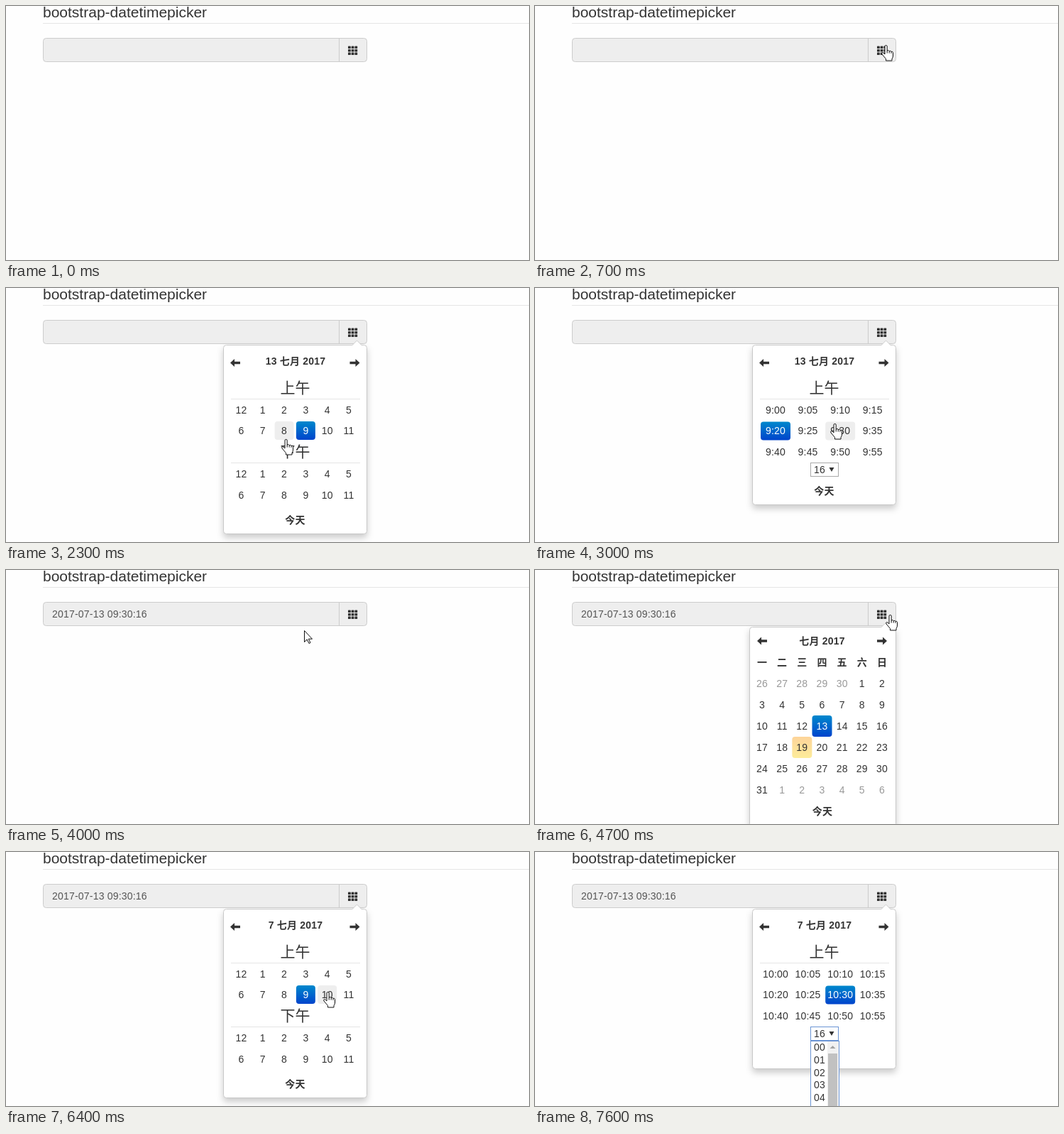
An HTML page for the animation above (8 s loop, 737 by 358 pixels).

```html
<!DOCTYPE html>
<html lang="en">
<head>
<meta charset="utf-8">
<title>Date time picker</title>
<style>
html, body { margin: 0; height: 100%; overflow: hidden; background: #fefefe; }
svg { display: block; }
text { font: 14px "Liberation Sans", Arial, "Noto Sans CJK SC", "Noto Sans CJK", sans-serif; letter-spacing: .2px; fill: #333; text-anchor: middle; white-space: pre; }
.bold { font-weight: bold; }
.big { font-size: 21px; letter-spacing: 0; }
.left { text-anchor: start; }
.old { fill: #999; }
.on { fill: #fff; }
.value { fill: #555; }
.line { stroke: #e5e5e5; }
.field { fill: #eee; stroke: #ccc; }
.popup { fill: #fff; stroke: #c9c9c9; filter: drop-shadow(0 5px 5px rgba(0,0,0,.2)); }
.icon { fill: #333; }
.mouse { fill: #fff; stroke: #111; stroke-linejoin: round; }
</style>
</head>
<body>
<svg width="737" height="358" viewBox="0 0 737 358">
  <defs>
    <linearGradient id="blue" x2="0" y2="1"><stop stop-color="#08c"/><stop offset="1" stop-color="#04c"/></linearGradient>
    <linearGradient id="gold" x2="0" y2="1"><stop stop-color="#fdd49a"/><stop offset="1" stop-color="#fdec9a"/></linearGradient>
  </defs>
  <text class="big left" x="52" y="16">bootstrap-datetimepicker</text>
  <path class="line" d="M52 24.5H737"/>
  <rect class="field" x="52.5" y="45.5" width="456" height="33" rx="4"/>
  <path stroke="#ccc" d="M469.5 46V78"/>
  <g id="scene"></g>
</svg>
<script>
const scene = document.getElementById('scene');
const LOOP = 8000, STEP = 100;

// Pointer hot spot: [step, x, y]
const path = [
  [2, 698, 61], [3, 574, 72], [4, 527, 65], [5, 488, 72], [6, 494, 55], [10, 494, 55],
  [11, 463, 150], [12, 463, 178], [13, 424, 212], [15, 388, 236], [16, 388, 236],
  [19, 391, 220], [21, 391, 220], [24, 395, 209], [26, 419, 199], [27, 419, 199],
  [30, 422, 191], [36, 422, 191], [37, 391, 118], [38, 391, 110], [40, 420, 85],
  [43, 490, 66], [45, 500, 63], [47, 500, 63], [49, 472, 92], [51, 452, 155],
  [53, 436, 203], [59, 436, 203], [64, 453, 197], [66, 453, 197],
  [71, 410, 254], [73, 410, 254], [76, 411, 365], [80, 411, 365]
];

let pointer, hand, menuOpen;

function pointerAt(step) {
  const i = path.findIndex(p => p[0] > step);
  if (i < 1) return null;
  const [t, x, y] = path[i - 1], [t2, x2, y2] = path[i];
  const k = (step - t) / (t2 - t);
  return { x: Math.round(x + (x2 - x) * k), y: Math.round(y + (y2 - y) * k) };
}

const text = (x, y, s, cls = '') => `<text class="${cls}" x="${x}" y="${y}">${s}</text>`;
const rect = (x, y, w, h, fill, r = 0) =>
  `<rect x="${x}" y="${y}" width="${w}" height="${h}" rx="${r}" fill="${fill}"/>`;

const over = (x, y, w, h) => pointer && !menuOpen &&
  pointer.x >= x && pointer.x < x + w && pointer.y >= y && pointer.y < y + h;

// Clickable cell, centred on (cx, cy)
function cell(cx, cy, w, h, label, cls = '', fill = '') {
  const x = cx - w / 2, y = cy - h / 2;
  if (over(x, y, w, h)) { hand = true; fill = fill || '#eee'; }
  return (fill ? rect(x, y, w, h, fill, 4) : '') + text(cx, cy + 5, label, cls);
}

const choice = (cx, cy, w, h, label, active) =>
  cell(cx, cy, w, h, label, active ? 'on' : '', active ? 'url(#blue)' : '');

function frame(left, right, bottom) {
  const tip = right - 13.5;
  return `<rect class="popup" x="${left + .5}" y="80.5" width="${right - left}" height="${bottom - 80}" rx="4"/>
    <path d="M${tip - 7} 81l7-7 7 7" fill="#fff" stroke="#ccc"/>`;
}

function arrows(x1, x2, y) {
  const d = 'M-7 0l6-5.5v3.7h8v3.6h-8v3.7z';
  return `<path class="icon" transform="translate(${x1} ${y})" d="${d}"/>
    <path class="icon" transform="translate(${x2} ${y}) scale(-1 1)" d="${d}"/>`;
}

function calendar(left, active) {
  const col = i => left + 18 + 28.17 * i;
  let s = frame(left, left + 206, 361) + cell(col(3), 100, 141, 30, '七月 2017', 'bold') +
    arrows(col(0), col(6), 100);
  [...'一二三四五六日'].forEach((d, i) => s += text(col(i), 135, d, 'bold'));
  for (let i = 0; i < 42; i++) {
    const d = i - 4, old = d < 1 || d > 31;
    const label = d < 1 ? d + 30 : d > 31 ? d - 31 : d;
    const cls = d === active ? 'on' : old ? 'old' : '';
    const fill = d === active ? 'url(#blue)' : d === 19 ? 'url(#gold)' : '';
    s += cell(col(i % 7), 160 + 30 * Math.floor(i / 7), 28, 30, label, cls, fill);
  }
  return s + text(left + 103, 345, '今天', 'bold');
}

const heading = (label, y) => text(407.5, y, label, 'big') +
  `<path class="line" d="M317 ${y + 8.5}H499"/>`;

const clockFrame = (day, bottom) => frame(306, 508, bottom) +
  text(408, 108, day + ' 七月 2017', 'bold') + arrows(323, 491.5, 105.5);

function hours(day) {
  let s = clockFrame(day, 346) + heading('上午', 148) + heading('下午', 238);
  for (let i = 0; i < 24; i++) {
    const y = [172, 201, 262, 292][Math.floor(i / 6)];
    s += choice(331.5 + 30.3 * (i % 6), y, 27, 26, i % 12 || 12, i === 9);
  }
  return s + text(407.5, 332, '今天', 'bold');
}

function minutes(day, hour, active) {
  let s = clockFrame(day, 305) + heading('上午', 148);
  for (let m = 0; m < 60; m += 5) {
    const i = m / 5, label = hour + ':' + String(m).padStart(2, '0');
    s += choice(339 + 45.6 * (i % 4), 172 + 29.4 * Math.floor(i / 4), 42, 26, label, m === active);
  }
  const edge = menuOpen ? '#6a94d4' : '#a9a9a9';
  s += text(407.5, 291, '今天', 'bold') +
    `<rect x="388.5" y="246.5" width="39" height="19" fill="#fff" stroke="${edge}"/>` +
    text(393, 261, '16', 'left') + '<path class="icon" d="M414.5 253h7l-3.500 6z"/>';
  return s + (menuOpen ? menu() : '');
}

function menu() {
  let s = '<rect x="388.5" y="266.5" width="40" height="100" fill="#fff" stroke="#6a94d4"/>';
  for (let i = 0; i < 6; i++) {
    const y = 267 + 17.8 * i;
    const hot = pointer.y >= y && pointer.y < y + 17.8 && y < 340;
    if (hot) s += rect(389, y, 23, 17.8, '#1e90ff');
    s += text(393, y + 13, '0' + i, hot ? 'left on' : 'left');
  }
  return s + rect(412, 267, 16, 100, '#f1f1f1') + rect(413, 284, 13, 90, '#c1c1c1') +
    '<path d="M415.5 277l4-4 4 4z" fill="#a3a3a3"/>';
}

function grid() {
  let s = '';
  for (let i = 0; i < 9; i++)
    s += rect(482 + 4.7 * (i % 3), 56.5 + 4.5 * Math.floor(i / 3), 3.8, 3.5, '#333', .6);
  return s;
}

function mouse() {
  if (!pointer) return '';
  const { x, y } = pointer;
  return hand
    ? `<path class="mouse" transform="translate(${x - 6} ${y})" d="M5 13V2a1.600 1.600 0 0 1 3.200 0v6q2.300-1.300 3 .6 2.200-1 2.800.7 2.300-.5 2.500 1.200v4.500q0 2.500-1.500 4.500v2.500H6.500v-2.500L1 13q-1-2.200.8-2.400 1.200 0 3.200 2.400z"/>
       <path stroke="#111" fill="none" transform="translate(${x - 6} ${y})" d="M8.200 8v3.500M11.200 8.600v3M14 9.300v2.500"/>`
    : `<path class="mouse" transform="translate(${x} ${y})" d="M.5.5v16l3.700-3.600 2.800 5.600 2-1-2.700-5.300h5.200z"/>`;
}

function popup(step) {
  if (step < 10) return '';
  if (step < 21) return calendar(294, 19);
  if (step < 28) return hours(13);
  if (step < 34) return minutes(13, 9, 20);
  if (step < 47) return '';
  if (step < 57) return calendar(302, 13);
  if (step < 66) return hours(7);
  return minutes(7, 10, 30);
}

function draw(step) {
  pointer = pointerAt(step);
  menuOpen = step >= 73;
  hand = over(469, 45, 40, 25);
  const value = step >= 34 ? text(65, 67, '2017-07-13 09:30:16', 'left value') : '';
  scene.innerHTML = value + grid() + popup(step) + mouse();
}

const start = performance.now();
let shown = -1;
function tick() {
  const step = Math.floor((performance.now() - start) % LOOP / STEP);
  if (step !== shown) draw(shown = step);
  requestAnimationFrame(tick);
}
tick();
</script>
</body>
</html>
```
